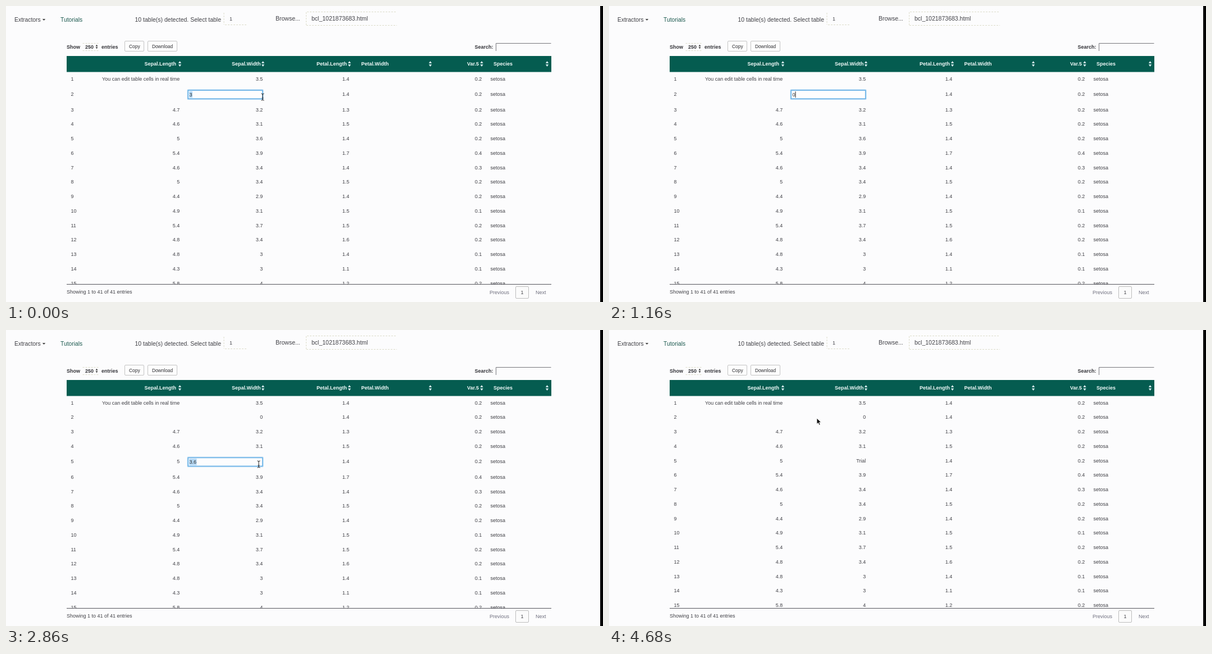
Animation, 1063 px wide and 527 px high, one loop 4720 ms. Source, as an HTML page:

```html
<!DOCTYPE html>
<html lang="en">
<head>
<meta charset="utf-8">
<title>Editable table</title>
<style>
  html, body { margin: 0; width: 100%; height: 100%; overflow: hidden; background: #fcfcfd; }
  svg { display: block; width: 1063px; height: 527px; }
  text { font: 9px "Liberation Sans", Arial, sans-serif; fill: #404046; }
  .nav text { font-size: 10.5px; }
  .bold text, .head text { font-weight: bold; }
  .bold text { fill: #333338; }
  .head text { fill: #f2faf9; }
  .btn text { font-size: 8.4px; fill: #2c2c30; }
  .btn rect { fill: #fdfdfd; stroke: #c4c4c4; }
  .end { text-anchor: end; }
  .mid { text-anchor: middle; }
  .faint { fill: none; stroke: #dcdcca; stroke-dasharray: 3 2; }
</style>
</head>
<body>
<svg viewBox="0 0 1063 527">
  <defs>
    <clipPath id="body"><rect x="108" y="118" width="863" height="377"/></clipPath>
    <path id="sort" d="M-2.7-.9 0-5 2.700-.9ZM-2.700 .9 0 5 2.700 .9Z"/>
  </defs>
  <rect width="1063" height="527" fill="#fcfcfd"/>

  <g class="nav">
    <text x="15" y="28" style="font-size:10.4px">Extractors</text>
    <path d="M64.800 23h5.400l-2.700 3z" fill="#444"/>
    <text x="97" y="28" style="font-size:10.3px;fill:#1d5a50">Tutorials</text>
    <text x="229.500" y="28">10 table(s) detected. Select table</text>
    <path class="faint" d="M388 12V33M390 33.500H428"/>
    <text x="398" y="25.500" style="font-size:9px">1</text>
    <text x="480" y="25.700">Browse...</text>
    <path class="faint" d="M534.500 34V10.500H696M535 34.500H696"/>
    <text x="544" y="25.700">bcl_1021873683.html</text>
  </g>

  <g class="bold">
    <text x="108" y="76">Show</text>
    <path class="faint" d="M136.500 66.500H166M136.500 79.500H166"/>
    <text x="141" y="76">250</text>
    <use href="#sort" transform="translate(161.500 72.500) scale(.7 .75)" fill="#333"/>
    <text x="170" y="76">entries</text>
    <text x="834.500" y="76">Search:</text>
  </g>
  <path d="M872.500 80V66.500H970.500" fill="none" stroke="#77777c"/>
  <g class="btn">
    <rect x="211.500" y="62.500" width="34" height="18" rx="1.500"/>
    <text class="mid" x="228.800" y="74.800">Copy</text>
    <rect x="252.500" y="62.500" width="52" height="18" rx="1.500"/>
    <text class="mid" x="278.500" y="74.800">Download</text>
  </g>

  <g class="head">
    <rect x="108" y="89" width="863" height="28.500" fill="#055c50"/>
    <text class="end" x="303" y="106.300">Sepal.Length</text>
    <text class="end" x="453.500" y="106.300">Sepal.Width</text>
    <text class="end" x="607" y="106.300">Petal.Length</text>
    <text x="632.500" y="106.300">Petal.Width</text>
    <text class="end" x="842" y="106.300">Var.5</text>
    <text x="868" y="106.300">Species</text>
    <g id="arrows" fill="#d5eaee"></g>
  </g>

  <g id="rows" clip-path="url(#body)"></g>
  <path d="M108 495.500H971" stroke="#55555c"/>
  <text x="108" y="512.300">Showing 1 to 41 of 41 entries</text>
  <text x="861" y="512.800" style="fill:#70707f">Previous</text>
  <rect x="907.500" y="499.500" width="23" height="21" rx="1.500" fill="#fbfbfb" stroke="#bdbdbd"/>
  <text class="mid" x="919" y="513">1</text>
  <text x="943" y="512.800" style="fill:#70707f">Next</text>

  <g id="field">
    <rect x="322.800" y="-9" width="135.400" height="18" rx="1.500" fill="none" stroke="#c9e4f7"/>
    <rect x="324.200" y="-7.600" width="132.600" height="15.200" fill="#fdfdfe" stroke="#66b0e6" stroke-width="1.700"/>
    <rect id="mark" x="326" y="-5.800" height="11.600" fill="#b4d8f5"/>
    <text id="typed" x="326.500" y="3.200" style="fill:#333"></text>
    <path id="caret" d="M0-5.500V5.500" stroke="#222"/>
  </g>

  <path id="arrow" d="M0 0V10.500L2.500 8.300 4.300 12.300 6.200 11.500 4.400 7.600H7.800Z" fill="#111" stroke="#fff" stroke-width=".8"/>
  <path id="beam" d="M-2.500-6Q0-6 0-4.500Q0-6 2.500-6M0-5V5M-2.500 6Q0 6 0 4.500Q0 6 2.500 6M-1.500 2H1.500" fill="none" stroke="#222" stroke-width="1"/>
  <rect x="1058" width="5" height="527" fill="#000"/>
</svg>

<script>
const LOOP = 4720, TOP = 129.5, STEP = 25.75;
const $ = id => document.getElementById(id);
const show = (el, on) => el.style.display = on ? '' : 'none';
const move = (el, x, y) => el.setAttribute('transform', `translate(${x} ${y})`);

function add(parent, tag, attrs, text = '') {
  const el = document.createElementNS('http://www.w3.org/2000/svg', tag);
  for (const key in attrs) el.setAttribute(key, attrs[key]);
  el.textContent = text;
  parent.append(el);
  return el;
}

for (const x of [309.5, 457.5, 611.5, 755.5, 847, 963.5])
  add($('arrows'), 'use', { href: '#sort', x, y: 103 });

// sepal length, sepal width, petal length, fifth variable
const data = `You can edit table cells in real time,3.5,1.4,0.2|,3,1.4,0.2|4.7,3.2,1.3,0.2
4.6,3.1,1.5,0.2|5,3.6,1.4,0.2|5.4,3.9,1.7,0.4|4.6,3.4,1.4,0.3|5,3.4,1.5,0.2|4.4,2.9,1.4,0.2
4.9,3.1,1.5,0.1|5.4,3.7,1.5,0.2|4.8,3.4,1.6,0.2|4.8,3,1.4,0.1|4.3,3,1.1,0.1|5.8,4,1.2,0.2`;
const edges = [309.3, 457.3, 611.3, 847.3];
const rows = data.split(/[|\n]/).map((line, i) => {
  const g = add($('rows'), 'g', {});
  add(g, 'text', { x: 115.5, y: 3.2 }, i + 1);
  const cells = line.split(',').map((value, c) =>
    add(g, 'text', { x: edges[c], y: 3.2, class: 'end' }, value));
  add(g, 'text', { x: 862.5, y: 3.2 }, 'setosa');
  return { g, width: cells[1] };
});

// each edit: row index, open and close times, typed text by time
const edits = [
  { row: 1, from: 0, to: 1200, result: '0', keys: [[0, '3', true], [620, '0']] },
  { row: 4, from: 2010, to: 4300, result: 'Trial', keys: [
    [2010, '3.6'], [2550, '3.6', true], [3560, 'T'], [3720, 'Tr'],
    [3880, 'Tri'], [4000, 'Tria'], [4100, 'Trial']] }
];

// pointer: time, x, y
const track = [
  [0, 457, 162], [1200, 457, 162], [1590, 450, 217], [1820, 450, 235],
  [2010, 450, 239], [4300, 450, 239], [4680, 370, 157]
];

function pointerAt(t) {
  const i = track.findIndex(p => p[0] > t);
  if (i < 0) return track[track.length - 1].slice(1);
  const [t0, x0, y0] = track[i - 1], [t1, x1, y1] = track[i];
  const k = (t - t0) / (t1 - t0), e = k * (2 - k);
  return [x0 + (x1 - x0) * e, y0 + (y1 - y0) * e];
}

function draw(t) {
  const edit = edits.find(e => t >= e.from && t < e.to);
  const open = edit ? edit.row : 99;
  rows.forEach(({ g, width }, i) => {
    const push = i > open ? 3.5 : i === open ? 1.6 : 0;
    move(g, 0, TOP + i * STEP + push);
    show(width, i !== open);
  });
  for (const e of edits)
    rows[e.row].width.textContent = t >= e.to ? e.result : e.keys[0][1];

  let typing = false;
  show($('field'), edit);
  if (edit) {
    const [, text, marked] = edit.keys.filter(k => k[0] <= t).pop();
    typing = text !== edit.keys[0][1];
    move($('field'), 0, TOP + edit.row * STEP + 2.4);
    $('typed').textContent = text;
    const length = $('typed').getComputedTextLength();
    $('mark').setAttribute('width', length + 1);
    show($('mark'), marked);
    show($('caret'), !marked);
    move($('caret'), 327 + length, 0);
  }

  const [x, y] = pointerAt(t);
  show($('beam'), edit && !typing);
  show($('arrow'), !edit);
  move($('beam'), x, y);
  move($('arrow'), x, y);
}

const start = performance.now();
function tick() {
  draw((performance.now() - start) % LOOP);
  requestAnimationFrame(tick);
}
tick();
</script>
</body>
</html>
```
